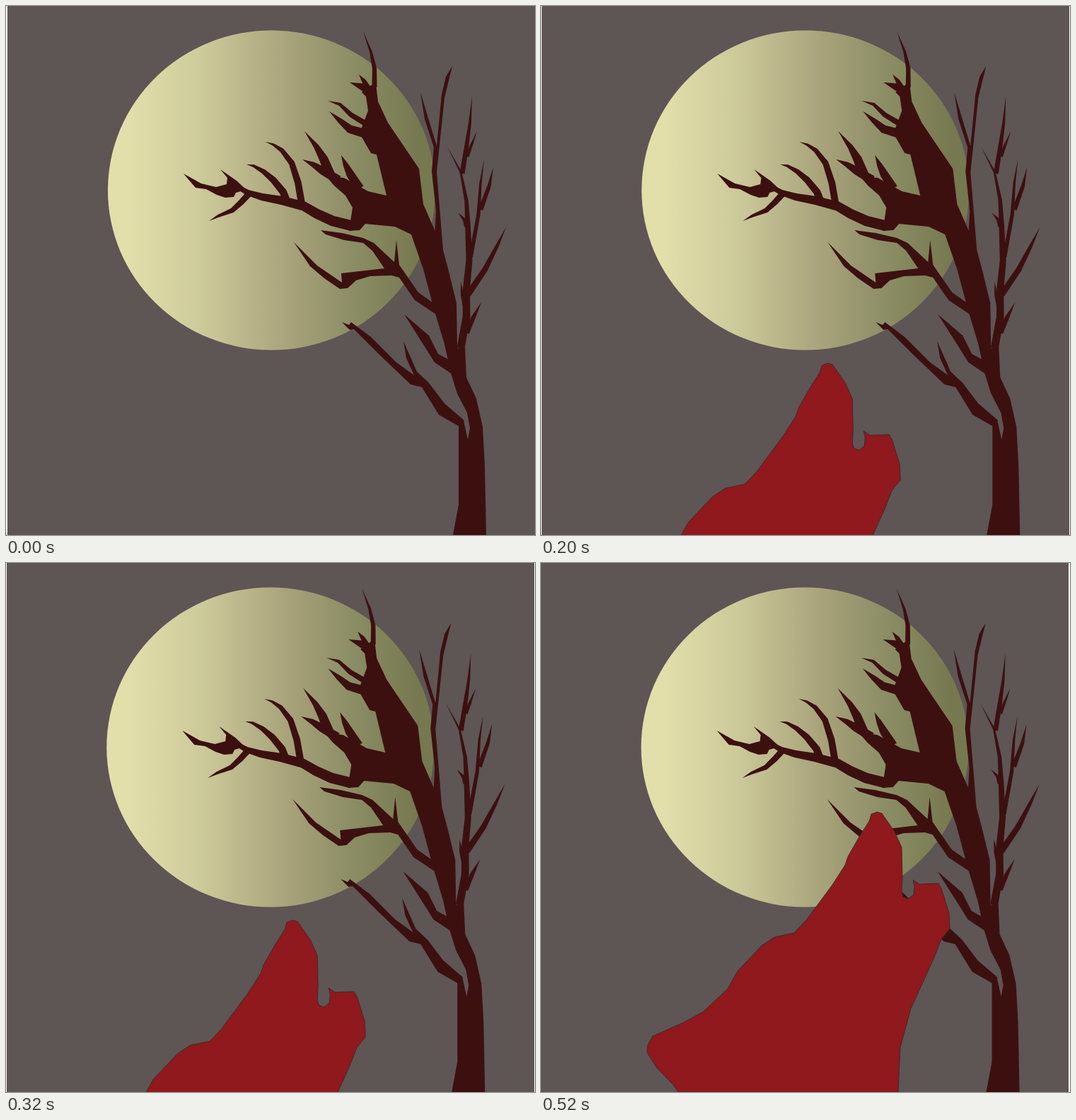
An HTML page with a canvas that plays this animation: 748 by 748 pixels, repeating every 0.6 s.

```html
<!DOCTYPE html>
<html lang="en">
<head>
<meta charset="utf-8">
<title>Howling wolf</title>
<style>
  html, body { margin: 0; width: 100%; height: 100%; overflow: hidden; background: #fff; }
  canvas { display: block; width: 100%; height: 100%; }
</style>
</head>
<body>
<canvas width="748" height="748"></canvas>
<script>
  const ctx = document.querySelector("canvas").getContext("2d");
  const STEP = 200;
  const tree = [];

  const shape = points => new Path2D(`M${points}z`);
  const wood = points => tree.push(shape(points));

  // Branch along a centre line, from its base width down to its tip width.
  function limb(base, line, tip = 0) {
    const n = line.match(/\d+/g).map(Number);
    const last = n.length / 2 - 1;
    const at = i => { const k = 2 * Math.max(0, Math.min(last, i)); return [n[k], n[k + 1]]; };
    const left = [], right = [];
    for (let i = 0; i <= last; i++) {
      const [x, y] = at(i), [ax, ay] = at(i - 1), [bx, by] = at(i + 1);
      const half = (tip + (base - tip) * (1 - (i / last) ** 2)) / 2;
      const scale = half / Math.hypot(bx - ax, by - ay);
      const dx = (ay - by) * scale, dy = (bx - ax) * scale;
      left.push([x + dx, y + dy]);
      right.unshift([x - dx, y - dy]);
    }
    wood([...left, ...right].join(" "));
  }

  // Trunk and crown
  wood("632 748 640 705 640 585 647 586 653 613 656 597 652 575 638 548 629 519 620 478 605 428 590 372 573 323 550 312 508 308 500 317 485 318 490 285 480 268 464 254 452 240 478 243 512 262 538 268 524 210 516 208 500 180 512 148 509 128 503 122 518 111 523 110 526 135 540 165 584 230 590 280 607 319 626 375 637 420 638 484 649 482 651 525 665 555 674 595 677 650 679 748");
  limb(7, "521 115 521 88 516 65 505 36");
  limb(13, "515 120 503 114 486 108");
  limb(8, "512 116 506 106 499 97");
  limb(8, "508 166 488 154 472 139 455 134");
  limb(13, "510 181 486 174 472 162 457 149");
  limb(13, "470 246 448 233 434 224 419 217");
  limb(14, "458 238 449 216 439 199 422 177");
  limb(13, "500 258 487 238 480 224 474 211");

  // Long limb on the left
  limb(15, "490 311 462 304 440 294 421 283 390 275 362 270 342 264 326 255", 6);
  wood("342 266 332 262 325 264 322 270 310 271 298 267 283 259 268 257 251 237 276 251 297 256 312 252 313 243 303 231 326 247 342 262");
  limb(9, "344 265 333 277 320 289 300 297 287 304");
  limb(11, "396 274 392 263 378 246 364 234 350 226 340 224");
  limb(10, "418 279 413 250 404 222 390 204 378 196 367 192");

  // Lower branches
  wood("608 436 578 416 556 384 545 381 515 382 495 388 483 399 472 400 450 385 430 368 407 334 440 367 475 391 474 378 500 375 535 371 518 346 505 335 478 331 452 323 445 317 475 321 505 328 520 335 549 362 552 331 556 366 583 405 610 424");
  wood("640 594 612 578 588 539 572 535 528 493 492 457 486 458 475 447 485 451 488 447 516 468 552 504 577 522 566 498 562 474 581 517 598 533 620 562 648 586");
  wood("630 520 606 504 591 480 563 436 598 466 611 492 626 500");

  // Stems on the right
  wood("606 325 608 290 602 234 605 200 592 160 586 122 609 198 616 125 622 100 631 85 620 130 609 235 618 345 626 375");
  limb(11, "643 484 651 440 651 400 655 360 653 310 651 275 643 235 624 199");
  limb(7, "645 237 651 200 656 165 659 128");
  limb(5, "652 213 658 197 666 177");
  limb(6, "651 312 648 302 639 292");
  limb(6, "657 355 668 295 671 250 676 217");
  limb(7, "671 288 683 255 689 228");
  limb(9, "653 408 677 373 694 340 707 313");
  limb(6, "649 425 645 408 643 390");
  limb(8, "651 462 661 440 672 419");

  const wolf = shape("475 352 467 355 464 365 450 387 434 415 430 427 412 455 375 505 358 523 330 529 312 541 278 577 264 602 230 634 203 649 158 669 151 681 150 692 163 713 187 738 194 748 505 748 508 685 523 630 555 560 566 532 578 517 577 495 566 460 562 453 535 454 526 448 528 457 527 469 519 475 512 472 510 465 511 445 510 402 500 380 489 364 482 354");

  const glow = ctx.createLinearGradient(144, 0, 607, 0);
  [[.06, "#e3dfab"], [.28, "#cecb9b"], [.55, "#a8a37b"], [.75, "#8b8d65"], [.95, "#76784f"]]
    .forEach(stop => glow.addColorStop(...stop));
  const moon = new Path2D();
  moon.ellipse(375.5, 260.5, 231.5, 226, 0, 0, 2 * Math.PI);

  const drift = [0, -1.7, -2.4];
  const wolfPose = [null, [-69.7, 153], [0, 0]];

  function fill(path, color) {
    ctx.fillStyle = color;
    ctx.fill(path);
  }

  function draw() {
    const step = Math.floor(performance.now() / STEP) % 3;
    ctx.clearRect(0, 0, 748, 748);
    ctx.fillStyle = "#5e5555";
    ctx.fillRect(2 - step, 0, 746, 748);

    ctx.save();
    ctx.translate(drift[step], 0);
    fill(moon, glow);
    tree.forEach(part => fill(part, "#3d1010"));
    ctx.restore();

    if (wolfPose[step]) {
      ctx.save();
      ctx.translate(...wolfPose[step]);
      fill(wolf, "#8f191c");
      ctx.strokeStyle = "#33272a";
      ctx.lineWidth = .8;
      ctx.lineJoin = "round";
      ctx.stroke(wolf);
      ctx.restore();
    }
    requestAnimationFrame(draw);
  }
  draw();
</script>
</body>
</html>
```
